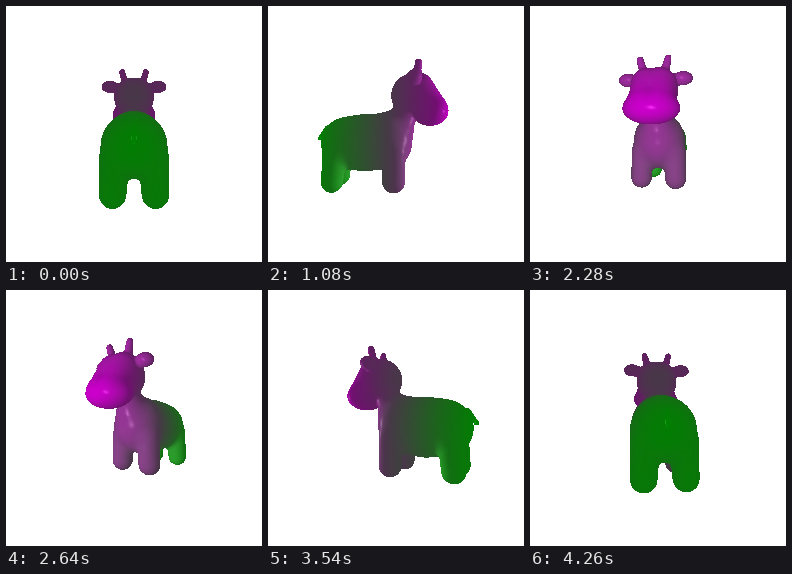
Animation of 256 by 256 pixels, one loop 4.32 s. Source, as an HTML page with a canvas:

```html
<!DOCTYPE html>
<html lang="en">
<head>
<meta charset="utf-8">
<title>Turning calf</title>
<style>
  html, body { margin: 0; width: 100%; height: 100%; overflow: hidden; background: #fff; }
  canvas { display: block; width: 100%; height: 100%; image-rendering: pixelated; }
</style>
</head>
<body>
<canvas id="stage" width="256" height="256"></canvas>
<script>
const start = performance.now();
const SIZE = 256, FRAME_MS = 60, FRAMES = 72;
const DISTANCE = 3, FOCAL = SIZE / 2 / Math.tan(Math.PI / 6);
const NOSE_Z = -0.69, TAIL_Z = 1.04;
const LIGHT = [0, 0, -3];

// Distance helpers. The model is mirrored in x, so only x >= 0 is described.
function ellipsoid(x, y, z, cx, cy, cz, rx, ry, rz) {
  const a = (x - cx) / rx, b = (y - cy) / ry, c = (z - cz) / rz;
  const k0 = Math.sqrt(a * a + b * b + c * c);
  const k1 = Math.sqrt((a / rx) ** 2 + (b / ry) ** 2 + (c / rz) ** 2);
  return k1 < 1e-6 ? -Math.min(rx, ry, rz) : k0 * (k0 - 1) / k1;
}

function limb(x, y, z, ax, ay, az, ar, bx, by, bz, br) {
  const dx = bx - ax, dy = by - ay, dz = bz - az;
  const px = x - ax, py = y - ay, pz = z - az;
  const t = Math.max(0, Math.min(1, (px * dx + py * dy + pz * dz) / (dx * dx + dy * dy + dz * dz)));
  const qx = px - t * dx, qy = py - t * dy, qz = pz - t * dz;
  return Math.sqrt(qx * qx + qy * qy + qz * qz) - ar - t * (br - ar);
}

function blend(a, b, k) {
  const h = Math.max(k - Math.abs(a - b), 0);
  return Math.min(a, b) - h * h / (4 * k);
}

function calf(x, y, z) {
  x = Math.abs(x);
  let body = ellipsoid(x, y, z, 0, -0.09, 0.11, 0.355, 0.39, 0.33);
  body = blend(body, ellipsoid(x, y, z, 0, -0.12, 0.65, 0.35, 0.35, 0.345), 0.08);
  body = blend(body, ellipsoid(x, y, z, 0, -0.115, 0.4, 0.345, 0.385, 0.42), 0.08);
  body = blend(body, limb(x, y, z, 0, 0.1, -0.04, 0.2, 0, 0.35, -0.14, 0.16), 0.08);
  body = blend(body, limb(x, y, z, 0.22, -0.25, 0.03, 0.15, 0.235, -0.595, 0.03, 0.143), 0.07);
  body = blend(body, limb(x, y, z, 0.195, -0.25, 0.77, 0.15, 0.21, -0.6, 0.805, 0.135), 0.07);
  body = blend(body, limb(x, y, z, 0, 0.08, 0.93, 0.035, 0, -0.065, 1.04, 0.022), 0.02);

  let head = ellipsoid(x, y, z, 0, 0.52, -0.22, 0.285, 0.29, 0.285);
  head = blend(head, limb(x, y, z, 0.09, 0.61, -0.3, 0.188, 0.08, 0.36, -0.46, 0.19), 0.06);
  head = blend(head, ellipsoid(x, y, z, 0, 0.295, -0.46, 0.335, 0.185, 0.235), 0.07);
  head = blend(head, limb(x, y, z, 0.2, 0.65, -0.22, 0.07, 0.36, 0.69, -0.22, 0.06), 0.03);
  head = blend(head, ellipsoid(x, y, z, 0.35, 0.685, -0.22, 0.122, 0.085, 0.095), 0.03);
  head = blend(head, limb(x, y, z, 0.125, 0.74, -0.27, 0.056, 0.175, 0.917, -0.285, 0.044), 0.03);
  return blend(body, head, 0.03);
}

function gradient(x, y, z) {
  const e = 0.004;
  const g = [
    calf(x + e, y, z) - calf(x - e, y, z),
    calf(x, y + e, z) - calf(x, y - e, z),
    calf(x, y, z + e) - calf(x, y, z - e)
  ];
  return g.map(v => v / (2 * e));
}

const normalize = v => {
  const n = Math.hypot(...v) || 1;
  return v.map(c => c / n);
};
const dot = (a, b) => a[0] * b[0] + a[1] * b[1] + a[2] * b[2];

function makeVertex(x, y, z) {
  let p = [x, y, z], g;
  for (let i = 0; i < 3; i++) {
    g = gradient(...p);
    const step = calf(...p) / Math.max(dot(g, g), 0.2);
    p = p.map((c, j) => c - g[j] * step);
  }
  const normal = normalize(gradient(...p));
  const toLight = normalize(LIGHT.map((c, i) => c - p[i]));
  const facing = dot(normal, toLight);
  const reflected = normal.map((c, i) => 2 * facing * c - toLight[i]);
  const shade = 255 * (0.5 + 0.3 * Math.max(0, facing));
  const green = Math.max(0, Math.min(1, (p[2] - NOSE_Z) / (TAIL_Z - NOSE_Z)));
  return { p, facing, reflected, purple: shade * (1 - green), green: shade * green };
}

// Surface net: one vertex per cell that the surface crosses.
function buildMesh() {
  const cell = 0.026, origin = [-0.533, -0.8, -0.77], dims = [42, 70, 73];
  const strides = [1, dims[0], dims[0] * dims[1]];
  const inside = new Uint8Array(dims[0] * dims[1] * dims[2]);
  const eachCell = visit => {
    for (let k = 0, n = 0; k < dims[2]; k++)
      for (let j = 0; j < dims[1]; j++)
        for (let i = 0; i < dims[0]; i++, n++) visit(n, i, j, k);
  };
  const at = (i, axis) => origin[axis] + i * cell;
  eachCell((n, i, j, k) => { inside[n] = calf(at(i, 0), at(j, 1), at(k, 2)) < 0 ? 1 : 0; });

  const vertices = [], triangles = [], index = new Int32Array(inside.length).fill(-1);
  eachCell((n, i, j, k) => {
    if (i === dims[0] - 1 || j === dims[1] - 1 || k === dims[2] - 1) return;
    let count = 0;
    for (let c = 0; c < 8; c++)
      count += inside[n + (c & 1) * strides[0] + (c >> 1 & 1) * strides[1] + (c >> 2) * strides[2]];
    if (count === 0 || count === 8) return;
    index[n] = vertices.length;
    vertices.push(makeVertex(at(i + 0.5, 0), at(j + 0.5, 1), at(k + 0.5, 2)));
  });
  eachCell(n => {
    for (let axis = 0; axis < 3; axis++) {
      if (inside[n] === inside[n + strides[axis]] || n + strides[axis] >= inside.length) continue;
      const u = strides[(axis + 1) % 3], v = strides[(axis + 2) % 3];
      const [a, b, c, d] = [n, n - u, n - u - v, n - v].map(m => vertices[index[m]]);
      if (a && b && c && d) triangles.push([a, b, c], [a, c, d]);
    }
  });
  return { vertices, triangles };
}

const { vertices, triangles } = buildMesh();
const context = document.getElementById('stage').getContext('2d');
const image = context.createImageData(SIZE, SIZE);
const pixels = image.data;
const nearest = new Float32Array(SIZE * SIZE);

function project(vertex, sin, cos) {
  const [x, y, z] = vertex.p;
  const depth = DISTANCE - x * sin - z * cos;
  vertex.sx = SIZE / 2 + FOCAL * (x * cos - z * sin) / depth;
  vertex.sy = SIZE / 2 - FOCAL * y / depth;
  vertex.near = 1 / depth;
  vertex.shine = 0;
  if (vertex.facing > 0) {
    const view = normalize([DISTANCE * sin - x, -y, DISTANCE * cos - z]);
    vertex.shine = 51 * Math.max(0, dot(view, vertex.reflected)) ** 64;
  }
}

function fillTriangle([a, b, c]) {
  const area = (b.sx - a.sx) * (c.sy - a.sy) - (c.sx - a.sx) * (b.sy - a.sy);
  if (Math.abs(area) < 1e-9) return;
  const left = Math.ceil(Math.min(a.sx, b.sx, c.sx) - 0.5);
  const right = Math.floor(Math.max(a.sx, b.sx, c.sx) - 0.5);
  const top = Math.ceil(Math.min(a.sy, b.sy, c.sy) - 0.5);
  const bottom = Math.floor(Math.max(a.sy, b.sy, c.sy) - 0.5);
  for (let row = top; row <= bottom; row++) {
    for (let col = left; col <= right; col++) {
      const x = col + 0.5, y = row + 0.5;
      const u = ((b.sx - x) * (c.sy - y) - (c.sx - x) * (b.sy - y)) / area;
      const v = ((c.sx - x) * (a.sy - y) - (a.sx - x) * (c.sy - y)) / area;
      const w = 1 - u - v;
      if (u < -1e-6 || v < -1e-6 || w < -1e-6) continue;
      const near = u * a.near + v * b.near + w * c.near;
      const n = row * SIZE + col;
      if (near <= nearest[n]) continue;
      nearest[n] = near;
      const shine = u * a.shine + v * b.shine + w * c.shine;
      const purple = u * a.purple + v * b.purple + w * c.purple + shine;
      pixels[4 * n] = pixels[4 * n + 2] = purple;
      pixels[4 * n + 1] = u * a.green + v * b.green + w * c.green + shine;
    }
  }
}

function draw(frame) {
  const angle = frame / FRAMES * 2 * Math.PI;
  const sin = Math.sin(angle), cos = Math.cos(angle);
  pixels.fill(255);
  nearest.fill(0);
  for (const vertex of vertices) project(vertex, sin, cos);
  triangles.forEach(fillTriangle);
  context.putImageData(image, 0, 0);
}

let shown = -1;
function tick() {
  const frame = Math.floor((performance.now() - start) / FRAME_MS) % FRAMES;
  if (frame !== shown) draw(shown = frame);
  requestAnimationFrame(tick);
}
tick();
</script>
</body>
</html>
```
